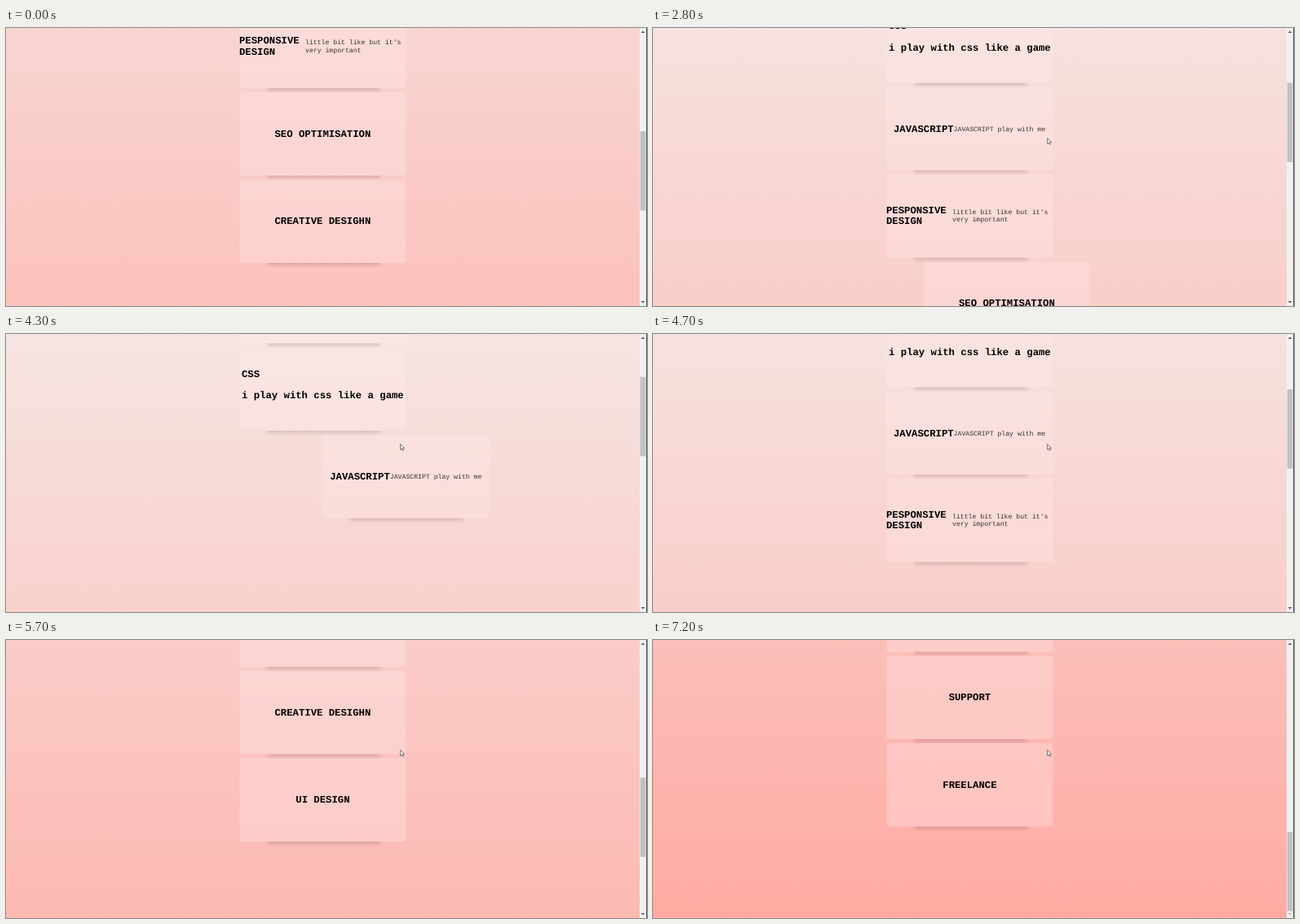
Animation, 786 px wide and 342 px high, one loop 8 s. Source, as an HTML page:

```html
<!DOCTYPE html>
<html lang="en">
<head>
<meta charset="utf-8">
<title>Scroll animation</title>
<style>
  html, body { margin: 0; width: 100%; height: 100%; overflow: hidden; }
  svg { display: block; width: 786px; height: 342px; }
  text {
    font-family: "Liberation Mono", "Courier New", monospace;
    text-rendering: geometricPrecision;
    white-space: pre;
  }
  .title { font-size: 25.6px; font-weight: bold; }
  .head { font-size: 12.28px; font-weight: bold; }
  .note { font-size: 8.17px; fill: #000; fill-opacity: .78; }
  .heart { fill: #e3001f; fill-opacity: 1; }
</style>
</head>
<body>
<svg id="stage" viewBox="0 0 786 342">
  <defs>
    <linearGradient id="sky" x1="0" y1="0" x2="0" y2="1">
      <stop offset="0" stop-color="#f4eeec"/>
      <stop offset="1" stop-color="#ffaaa3"/>
    </linearGradient>
    <filter id="soft" x="-20%" y="-60%" width="140%" height="220%">
      <feGaussianBlur stdDeviation="2.2"/>
    </filter>
    <clipPath id="below"><rect x="0" y="102.5" width="204" height="20"/></clipPath>
  </defs>
  <g id="page">
    <rect width="786" height="1138" fill="url(#sky)"/>
    <text class="title" x="135" y="27">Animatation on scroll-Scroll down</text>
    <text class="note" x="281" y="46.8">Made with<tspan class="heart">♥</tspan> by nadeem tarwazi</text>
    <g id="cards"></g>
  </g>
  <g id="bar">
    <rect x="777" width="9" height="342" fill="#f1f1f1"/>
    <rect x="785" width="1" height="342" fill="#55504f"/>
    <path id="up" d="M778.8 6L781 3.6L783.2 6Z"/>
    <path id="down" d="M778.8 336L781 338.4L783.2 336Z"/>
    <rect id="thumb" x="777.7" width="6.6" height="97.5" fill="#c1c1c1"/>
  </g>
  <path id="cursor" d="M0 0V7L1.6 5.6L2.7 8L3.8 7.5L2.8 5.2H4.9Z" fill="#fff" stroke="#444" stroke-width=".7"/>
</svg>
<script>
const LOOP = 8000, STEP = 100;
const VIEW = 342, MAX = 795.5;
const CARD = { x: 286.4, y: 62.5, w: 204, h: 102.5, pitch: 107.5 };
const AWAY = CARD.w * 4;

const $ = id => document.getElementById(id);
const head = (x, y, s) => `<text class="head" x="${x}" y="${y}">${s}</text>`;
const note = (x, y, s) => `<text class="note" x="${x}" y="${y}">${s}</text>`;
const label = s => `<text class="head" x="102" y="54.7" text-anchor="middle">${s}</text>`;

// leave / enter: when a card slides out and back in; span: length of the way in
const cards = [
  { body: head(33.4, 55.2, "HTML") + note(63, 54.4, "i am very good in html") },
  { body: head(2.6, 36.4, "CSS") + head(2.6, 62.8, "i play with css like a game") },
  { body: head(8.6, 55, "JAVASCRIPT") + note(82.2, 54.2, "JAVASCRIPT play with me"),
    leave: 3010, enter: 4066, span: 400 },
  { body: head(-.4, 47.5, "PESPONSIVE") + head(-.4, 61.4, "DESIGN") +
          note(80.6, 48.6, "little bit like but it's") + note(80.6, 58.2, "very important"),
    leave: 2890, enter: 4250, span: 400 },
  { body: label("SEO OPTIMISATION"), leave: 2780, enter: 4784, span: 400 },
  { body: label("CREATIVE DESIGHN"), leave: 2680, enter: 5050, span: 250 },
  { body: label("UI DESIGN"), leave: -LOOP, enter: 5450, span: 250 },
  { body: label("SUPPORT"), leave: -LOOP, enter: 5850, span: 250 },
  { body: label("FREELANCE"), leave: -LOOP, enter: 7045, span: 100 }
];

const scrollKeys = [
  [2500, 413.5], [2600, 390], [2700, 318], [2800, 205], [2900, 100], [3000, 25], [3100, 0],
  [3900, 0], [4000, 14], [4100, 60], [4200, 112], [4300, 153.5], [4400, 180], [4500, 197],
  [4700, 207], [4800, 219], [5000, 315], [5100, 364.5], [5200, 398], [5300, 413.5],
  [5400, 413.5], [5500, 460], [5600, 525], [5700, 562],
  [5800, 562], [5900, 600], [6000, 645], [6100, 663],
  [6200, 663], [6300, 722], [6400, 772], [6500, 789], [6600, MAX]
];
const cursorX = [[2100, 521.7], [2200, 491], [2300, 483.6]];
const cursorY = [[2100, 62.6], [2200, 119], [2300, 135.4]];

$("cards").innerHTML = cards.map(c => `<g>
  <g clip-path="url(#below)"><rect x="34" y="78" width="138" height="27.5" fill="#300" fill-opacity=".15" filter="url(#soft)"/></g>
  <rect width="${CARD.w}" height="${CARD.h}" rx="4" fill="#fdeaea" fill-opacity=".32"/>
  ${c.body}</g>`).join("");
const nodes = [...$("cards").children];

function along(keys, t) {
  if (t <= keys[0][0]) return keys[0][1];
  for (let i = 1; i < keys.length; i++) {
    const [a, v] = keys[i - 1], [b, w] = keys[i];
    if (t <= b) return v + (w - v) * (t - a) / (b - a);
  }
  return keys[keys.length - 1][1];
}

// cubic-bezier(.25, .1, .25, 1)
function ease(p) {
  if (p <= 0) return 0;
  if (p >= 1) return 1;
  const curve = (u, a, b) => 3 * u * (1 - u) * ((1 - u) * a + u * b) + u ** 3;
  let lo = 0, hi = 1;
  for (let i = 0; i < 24; i++) {
    const mid = (lo + hi) / 2;
    if (curve(mid, .25, .25) < p) lo = mid; else hi = mid;
  }
  return curve(lo, .1, 1);
}

function shift(card, i, t) {
  if (!card.enter) return 0;
  const gone = t < card.enter
    ? ease((t - card.leave) / 280)
    : 1 - ease((t - card.enter) / card.span);
  return (i % 2 ? -AWAY : AWAY) * gone;
}

function move(node, x, y) {
  node.setAttribute("transform", `translate(${x.toFixed(2)} ${y.toFixed(2)})`);
}

function draw(t) {
  const top = along(scrollKeys, t);
  move($("page"), 0, -top);
  cards.forEach((c, i) => move(nodes[i], CARD.x + shift(c, i, t), CARD.y + i * CARD.pitch));
  $("thumb").setAttribute("y", 9 + top / MAX * 227);
  $("up").setAttribute("fill", top > 0 ? "#505050" : "#b5b5b5");
  $("down").setAttribute("fill", top < MAX ? "#505050" : "#b5b5b5");
  $("cursor").setAttribute("visibility", t < 2100 ? "hidden" : "visible");
  move($("cursor"), along(cursorX, t), along(cursorY, t));
}

const start = performance.now();
function tick() {
  const t = (performance.now() - start) % LOOP;
  draw(Math.floor(t / STEP) * STEP);
  requestAnimationFrame(tick);
}
tick();
</script>
</body>
</html>
```
